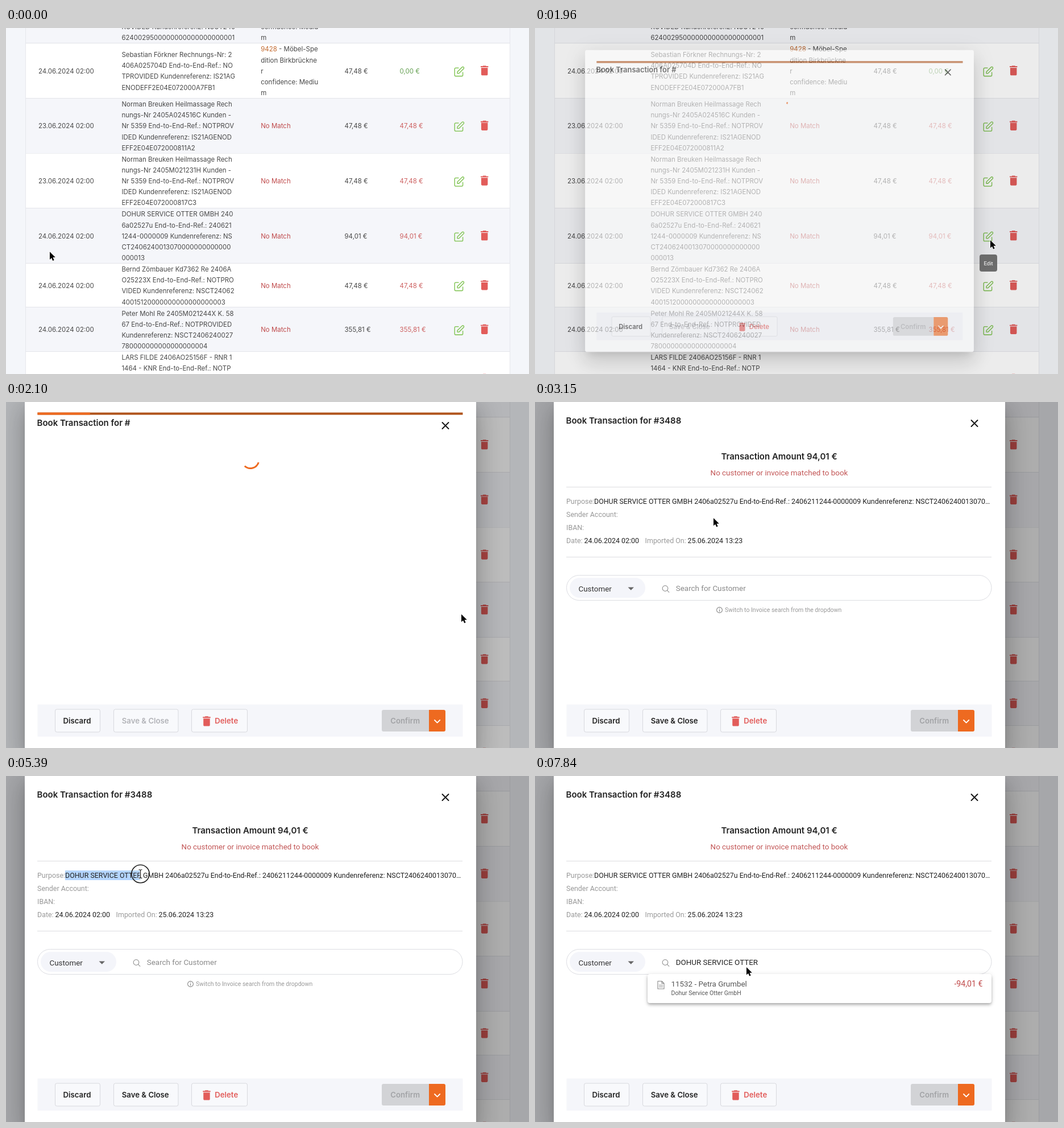
Animation of 920x608 px, one loop 8 s. Source, as an HTML page:

```html
<!DOCTYPE html>
<html lang="en">
<head>
<meta charset="utf-8">
<title>Book transaction</title>
<style>
html, body { margin: 0; width: 100%; height: 100%; overflow: hidden; }
#stage { position: relative; width: 100%; height: 100%; overflow: hidden; contain: strict; background: #f4f6fa; }
svg { position: absolute; left: 0; top: 0; width: 920px; height: 608px; }
text { font-family: Roboto, sans-serif; font-size: 13.4px; white-space: pre; }
#page text { font: 11.48px Inter, sans-serif; }
text.head { font: 600 15px Inter, sans-serif; }
text.btn { font: 600 13.2px Inter, sans-serif; }
text.info { font-size: 12.44px; }
text.small { font-size: 10.53px; }
#shade { position: absolute; inset: 0; background: #000; }
#modal {
  position: absolute; left: 32.5px; top: -4px; width: 794px; height: 616px; background: #fff; border-radius: 4px;
  box-shadow: 0 11px 15px -7px rgba(0,0,0,.2), 0 24px 38px 3px rgba(0,0,0,.14), 0 9px 46px 8px rgba(0,0,0,.12);
}
#modal svg { left: -32.5px; top: 4px; overflow: visible; }
#panel {
  position: absolute; left: 165.5px; top: 352px; width: 605px; background: #fff; border-radius: 4px;
  box-shadow: 0 2px 4px -1px rgba(0,0,0,.2), 0 4px 5px rgba(0,0,0,.14), 0 1px 10px rgba(0,0,0,.12);
}
#panel svg { left: -198px; top: -348px; }
</style>
</head>
<body>
<div id="stage">
<svg id="page"></svg>
<div id="shade"></div>
<div id="modal"><svg id="form"></svg><div id="panel"><svg id="result"></svg></div></div>
<svg id="top"></svg>
</div>
<script>
const $ = id => document.getElementById(id);
const zeros = n => '0'.repeat(n);
const text = (x, y, s, fill = '#484848', attrs = '') => `<text x="${x}" y="${y}" fill="${fill}" ${attrs}>${s}</text>`;
const rect = (x, y, w, h, fill, attrs = '') => `<rect x="${x}" y="${y}" width="${w}" height="${h}" fill="${fill}" ${attrs}/>`;
const path = (d, attrs) => `<path d="${d}" ${attrs}/>`;
const line = (stroke, width) => `fill="none" stroke="${stroke}" stroke-width="${width}" stroke-linecap="round" stroke-linejoin="round"`;

// ---- table ----
const RED = '#e25c5a', ORANGE = '#ee6a20';
const trash = (x, y) => path('M6 19c0 1.1.9 2 2 2h8c1.1 0 2-.9 2-2V7H6v12zM19 4h-3.5l-1-1h-5l-1 1H5v2h14V4z',
  `fill="${RED}" transform="translate(${x} ${y}) scale(.957)"`);
const pencil = (x, y) => path('M11 5H6a2 2 0 00-2 2v11a2 2 0 002 2h11a2 2 0 002-2v-5m-1.414-9.414a2 2 0 112.828 2.828L11.828 15H9v-2.828l8.586-8.586z',
  `${line('#8ac860', 1.6)} transform="translate(${x} ${y}) scale(.957)"`);
const NONE = ['No Match'];
const rows = [
  [5, '', ['', '', '', 'ROVIDED Kundenreferenz: NSCT240', '62400295' + zeros(19) + '1'],
    ['', '', '', 'confidence: Mediu', 'm'], '', ''],
  [5, '24.06.2024 02:00', ['Sebastian Förkner Rechnungs-Nr: 2', '406A025704D End-to-End-Ref.: NO', 'TPROVIDED Kundenreferenz: IS21AG', 'ENODEFF2E04E072000A7FB1'],
    ['<tspan fill="#c2692e">9428</tspan> - Möbel-Spe', 'dition Birkbrückne', 'r', 'confidence: Mediu', 'm'], '47,48 €', '0,00 €'],
  [5, '23.06.2024 02:00', ['Norman Breuken Heilmassage Rech', 'nungs-Nr 2405A024516C Kunden -', 'Nr 5359 End-to-End-Ref.: NOTPROV', 'IDED Kundenreferenz: IS21AGENOD', 'EFF2E04E072000811A2'],
    NONE, '47,48 €', '47,48 €'],
  [5, '23.06.2024 02:00', ['Norman Breuken Heilmassage Rech', 'nungs-Nr 2405M021231H Kunden -', 'Nr 5359 End-to-End-Ref.: NOTPROV', 'IDED Kundenreferenz: IS21AGENOD', 'EFF2E04E072000817C3'],
    NONE, '47,48 €', '47,48 €'],
  [5, '24.06.2024 02:00', ['DOHUR SERVICE OTTER GMBH 240', '6a02527u End-to-End-Ref.: 240621', '1244-0000009 Kundenreferenz: NS', 'CT240624001307' + zeros(13), '000013'],
    NONE, '94,01 €', '94,01 €'],
  [4, '24.06.2024 02:00', ['Bernd Zömbauer Kd7362 Re 2406A', 'O25223X End-to-End-Ref.: NOTPRO', 'VIDED Kundenreferenz: NSCT24062', '4001512' + zeros(18) + '3'],
    NONE, '47,48 €', '47,48 €'],
  [4, '24.06.2024 02:00', ['Peter Mohl Re 2405M021244X K. 58', '67 End-to-End-Ref.: NOTPROVIDED', 'Kundenreferenz: NSCT2406240027', '78' + zeros(18) + '4'],
    NONE, '355,81 €', '355,81 €'],
  [5, '', ['LARS FILDE 2406AO25156F - RNR 1', '1464 - KNR End-to-End-Ref.: NOTP', '', '', ''], [], '', ''],
];
let y = -69.3, table = rect(0, 0, 920, 608, '#f4f6fa');
rows.forEach(([n, date, info, match, amount, open], i) => {
  const h = n * 19.15 + .9, mid = y + h / 2, base = mid + 4.1;
  const lines = (x, list, fill) => list.map((s, k) => text(x, base + (k - (list.length - 1) / 2) * 19.15, s, fill)).join('');
  table += rect(34, y, 853, h, i % 2 ? '#fff' : '#f5f6fa') + rect(34, Math.round(y + h) - 1, 853, 1, '#e3e4e9')
    + text(57, base, date) + lines(203.4, info) + lines(448.2, match, match === NONE ? '#bf4a4b' : undefined)
    + text(595.5, base, amount) + text(692.6, base, open, open[0] === '0' ? '#65a052' : '#cd6161')
    + pencil(785.4, mid - 10.2) + trash(830.2, mid - 12.4);
  y += h;
});
$('page').innerHTML = table + rect(34, 0, 1, 608, '#e6e7ec') + rect(886, 0, 1, 608, '#e6e7ec');

// ---- dialog ----
const DARK = '#222', GREY = '#999', NAME = 'DOHUR SERVICE OTTER';
const button = (x, w) => rect(x + .5, 540, w, 40, '#f8f9fc', 'rx="3" stroke="#d8d9de"');
const info = (x, y, s, fill = GREY) => text(x, y, s, fill, 'class="info"');
$('form').innerHTML = `
<g id="header">${text(54.5, 38, '<tspan id="title"></tspan>', DARK, 'class="head"')}
${path('M767.5 32l11 11m0-11l-11 11', line('#111', 1.9))}</g>
<g id="loading">${rect(55.5, 18.5, 748, 4, '#b0541c')}<rect id="bar" x="55.5" y="18.5" height="4" fill="${ORANGE}"/>
<path id="spin" fill="none" stroke="${ORANGE}" stroke-width="3"/></g>
<g id="loaded">
${text(429.5, 101.2, 'Transaction Amount 94,01 €', DARK, 'class="head" text-anchor="middle"')}
${text(429.5, 129, 'No customer or invoice matched to book', '#c25555', 'text-anchor="middle"')}
${rect(55, 149, 748, 1, '#dcdde0')}${rect(55, 272, 748, 1, '#dcdde0')}
<rect id="mark" x="104" y="166" height="17" fill="#b4d5fe"/>
${info(55, 179.4, 'Purpose:')}${info(104, 179.4, NAME + ' GMBH 2406a02527u End-to-End-Ref.: 2406211244-0000009 Kundenreferenz: NSCT2406240013070…', DARK)}
${info(55, 202.4, 'Sender Account:')}${info(55, 225.4, 'IBAN:')}
${info(55, 248.4, 'Date:')}${info(86.5, 248.4, '24.06.2024 02:00', DARK)}
${info(193.6, 248.4, 'Imported On:')}${info(268.6, 248.4, '25.06.2024 13:23', DARK)}
${rect(55.5, 304.5, 747.5, 44, '#fff', 'rx="22" stroke="#dcdde2"')}${rect(61, 309, 133, 35, '#f4f5fa', 'rx="17.5"')}
${text(76.5, 332.6, 'Customer', '#333')}${path('M163.5 325.5h10.5l-5.2 5.2z', 'fill="#666"')}
<circle cx="229" cy="327.5" r="4.8" ${line('#999', 1.2)}/>${path('M232.6 331.2l3.2 3.2', line('#999', 1.2))}
${text(247.8, 332.4, 'Search for Customer', '#8a8a8a', 'id="hint"')}${text(247.8, 332.4, NAME, DARK, 'id="query"')}
<rect id="caret" y="320" width="1" height="15.5" fill="#d96a3a"/>
<circle cx="324.5" cy="365.5" r="4.9" ${line('#888', 1.1)}/>${path('M324.5 365v3m0-5.2v.1', line('#888', 1.1))}
${text(334, 369.2, 'Switch to Invoice search from the dropdown', GREY, 'class="small"')}
</g>
${rect(55.5, 531.5, 748, 56.5, '#f5f6fa')}
${button(86, 79)}${text(100.6, 564.8, 'Discard', DARK, 'class="btn"')}
${button(189, 113.5)}${text(203.8, 564.8, 'Save &amp; Close', DARK, 'class="btn" id="save"')}
${button(326, 98)}${trash(341.5, 549.5)}${text(367.3, 564.8, 'Delete', RED, 'class="btn"')}
${path('M744 541h-80q-3 0-3 3v32q0 3 3 3h80z', 'fill="#d2d3d6"')}${text(676.3, 564.8, 'Confirm', '#a2a3a6', 'class="btn"')}
${path('M744 541h26q3 0 3 3v32q0 3-3 3h-26z', `fill="${ORANGE}"`)}${path('M754 559l4.6 4.6 4.6-4.6', line('#fff', 1.8))}`;
$('result').innerHTML = path('M216 360.5h7l4 4v9.5h-11zM223 360.5v4h4M218.5 367.5h6M218.5 370.5h6', line('#888', 1.1))
  + text(239.5, 370.4, '11532 - Petra Grumbel', '#555') + text(239.5, 384.6, 'Dohur Service Otter GmbH', '#555', 'class="small"')
  + text(787.5, 370.4, '-94,01 €', '#c04a4a', 'text-anchor="end" style="font-size:14.2px"');

// ---- tooltip and pointer ----
$('top').innerHTML = `
<g id="tip">${rect(782, 398, 31, 30, '#616161', 'rx="4" fill-opacity=".92"')}${text(797.5, 416.5, 'Edit', '#fff', 'text-anchor="middle" style="font-size:9.6px"')}</g>
<g id="pointer">
${path('M0 0v13.6l3.1-2.9 2.1 4.9 2.4-1-2.1-4.8h4.3z', 'id="arrow" fill="#000" stroke="#fff" stroke-width="1.2" paint-order="stroke"')}
${path('M-1.2 1.2q1.2-2 2.4 0v4.3q1.8-1.6 2.6.3 1.8-1 2.5.5 2.2-.4 2.2 1.6v3.2q0 2.4-1.6 4.4H-.6q-.8-2-3.6-4.7-1.4-1.8.2-2.2 1.5 0 2.8 1.6z', 'id="hand" fill="#fff" stroke="#111" stroke-width="1.1"')}
<g id="beam">${['#fff', '#222'].map((c, i) => path('M-2.5-7.5Q0-7.5 0-5.5Q0-7.5 2.5-7.5M0-5.5V5.5M-2.5 7.5Q0 7.5 0 5.5Q0 7.5 2.5 7.5', line(c, i ? 1.2 : 2.6))).join('')}</g>
<circle id="click" r="15.7" fill="none" stroke="#222" stroke-width="1.6"/>
</g>`;

// Pointer stops: time, x, y
const stops = [
  [0, 77, 393.3], [420, 77, 393.3], [560, 190, 408], [700, 430, 432], [840, 690, 444], [910, 790, 442], [980, 834, 432],
  [1050, 822, 404], [1120, 804, 379], [1190, 801, 373], [2660, 801, 373], [2800, 690, 335], [2940, 480, 262],
  [3080, 332, 209], [3150, 314, 204], [3360, 314, 204], [3500, 292, 200], [3780, 185, 184], [3990, 120, 173],
  [4200, 107, 171], [4270, 107.5, 171.5], [4480, 107.5, 171.5], [4690, 130, 171.5], [5110, 215, 172],
  [5320, 238, 172], [5390, 236.5, 172], [5460, 239, 172.3], [5950, 239, 172.3], [6090, 268, 205],
  [6230, 325, 280], [6370, 366, 329], [6440, 372, 336], [8000, 372, 336],
];
const clamp = u => Math.max(0, Math.min(1, u));
const easeOut = u => 1 - (1 - clamp(u)) ** 3;
const within = (t, a, b) => t >= a && t < b;
const show = (id, on) => $(id).style.display = on ? '' : 'none';

function pointerAt(t) {
  const i = stops.findIndex(s => s[0] > t), [t0, x0, y0] = stops[i - 1], [t1, x1, y1] = stops[i];
  const u = (t - t0) / (t1 - t0);
  return [x0 + (x1 - x0) * u, y0 + (y1 - y0) * u];
}
const polar = deg => {
  const a = deg * Math.PI / 180;
  return `${430 + 15 * Math.cos(a)} ${101.5 + 15 * Math.sin(a)}`;
};

function draw(t) {
  const [px, py] = pointerAt(t), ready = t >= 2380;

  // opening and loading
  const grow = easeOut((t - 1926) / 150);
  $('shade').style.opacity = .32 * easeOut((t - 1926) / 400);
  show('modal', grow > 0);
  $('modal').style.opacity = clamp(grow * 1.1);
  $('modal').style.transform = grow < 1 ? `scale(${.7 + .3 * grow})` : '';
  show('loading', !ready);
  show('loaded', ready);
  $('header').setAttribute('transform', `translate(0 ${ready ? 0 : 4})`);
  $('title').textContent = 'Book Transaction for #' + (ready ? '3488' : '');
  $('save').setAttribute('fill', ready ? DARK : '#b2b3b8');
  const run = Math.max(0, t - 1960), tail = 3 + run * .107, sweep = Math.min(270, 14 + run * .72);
  $('spin').setAttribute('d', `M${polar(tail)}A15 15 0 ${+(sweep > 180)} 1 ${polar(tail + sweep)}`);
  $('bar').setAttribute('width', Math.max(0, Math.min(748, (t - 1990) * .84)));

  // selecting, pasting, result
  show('mark', within(t, 4620, 6510));
  $('mark').setAttribute('width', t < 5460 ? Math.max(0, Math.min(px, 239) - 104) : 135);
  const pasted = t >= 7140;
  show('hint', !pasted);
  show('query', pasted);
  show('caret', within(t, 6510, 7560));
  $('caret').setAttribute('x', pasted ? 394.5 : 248.5);
  show('panel', t >= 7560);
  $('panel').style.opacity = clamp((t - 7490) / 140);
  $('panel').style.height = 204 - 153.5 * easeOut((t - 7630) / 210) + 'px';
  show('result', t >= 7770);

  // pointer
  show('tip', within(t, 1120, 2030));
  $('tip').style.opacity = t < 1190 ? .5 : 1;
  const hand = within(t, 1120, 1960), beam = within(t, 3990, 6090);
  show('hand', hand);
  show('beam', beam);
  show('arrow', !hand && !beam);
  show('click', within(t, 1820, 1960) || within(t, 4410, 5740) || within(t, 6440, 6650));
  $('click').setAttribute('transform', `translate(${beam ? '0 0' : hand ? '2 8' : '4.5 7'})`);
  $('pointer').setAttribute('transform', `translate(${px} ${py})`);
}

const STEP = 70, LOOP = 8000, start = performance.now();
function tick() {
  const t = (performance.now() - start) % LOOP;
  draw(Math.min(7840, Math.floor(t / STEP) * STEP));
  requestAnimationFrame(tick);
}
tick();
</script>
</body>
</html>
```
